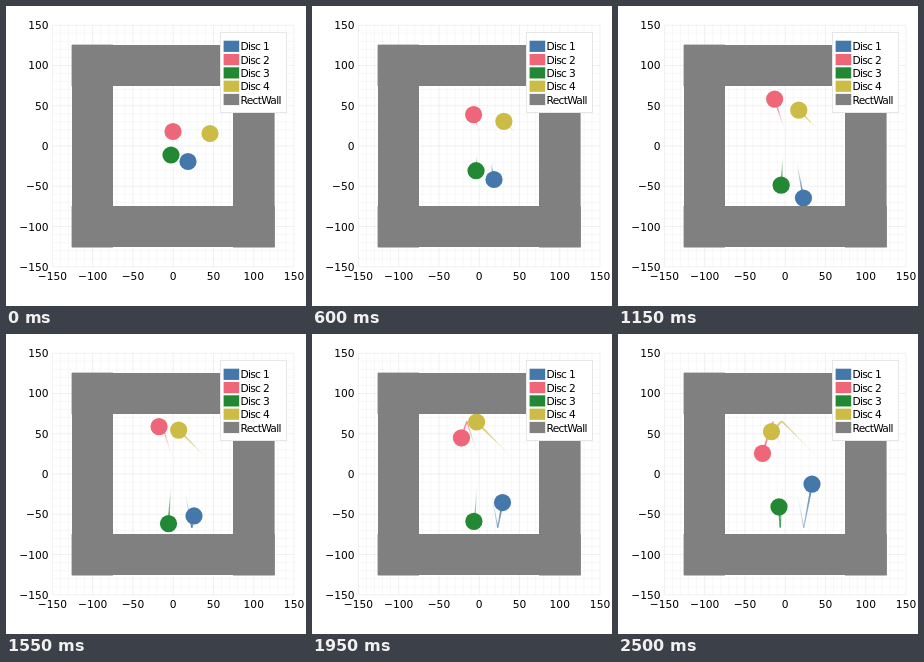
Animation of 300 by 300 pixels, one loop 2.55 s. Source, as an HTML page with a canvas:

```html
<!DOCTYPE html>
<html lang="en">
<head>
<meta charset="utf-8">
<title>Bouncing discs</title>
<style>
  html, body { margin: 0; width: 100%; height: 100%; overflow: hidden; background: #fff; }
  canvas { display: block; width: 300px; height: 300px; }
</style>
</head>
<body>
<canvas id="stage" width="300" height="300"></canvas>
<script>
const ctx = document.getElementById('stage').getContext('2d');
const STEP = 50, STEPS = 51, RADIUS = 8.6;
const TOP = 87.2, BOTTOM = 193.7, SCALE = 0.8055;
const GRAY = '#808080';
const px = x => 167.2 + x * SCALE;
const py = y => 140 - y * SCALE;

// Start point and velocity in pixels per step; a hit switches to a second leg.
const discs = [
  { color: '#4477aa', x: 182, y: 155.5, vx: -0.57, vy: 1.18,
    hit: 4.3, after: { x: 178.2, y: 153.35, vx: 0.316, vy: 1.68 } },
  { color: '#ee6677', x: 167, y: 125.5, vx: -0.45, vy: -1.41 },
  { color: '#228833', x: 165, y: 149, vx: -0.08, vy: 1.31 },
  { color: '#ccbb44', x: 204, y: 127.5, vx: -1.01, vy: -1.013 }
];

function bounce(y) {
  if (y < TOP) return 2 * TOP - y;
  return y > BOTTOM ? 2 * BOTTOM - y : y;
}

function position(disc, step) {
  const leg = step > disc.hit ? disc.after : disc;
  return [leg.x + leg.vx * step, bounce(leg.y + leg.vy * step)];
}

function line(x1, y1, x2, y2) {
  ctx.beginPath();
  ctx.moveTo(x1, y1);
  ctx.lineTo(x2, y2);
  ctx.stroke();
}

function drawAxes() {
  ctx.font = '10.67px "DejaVu Sans", sans-serif';
  ctx.letterSpacing = '0px';
  ctx.lineWidth = 1;
  for (let v = -150; v <= 150; v += 10) {
    const major = v % 50 === 0;
    ctx.strokeStyle = `rgba(0,0,0,${major ? 0.06 : 0.03})`;
    line(px(v), py(150), px(v), py(-150));
    line(px(-150), py(v), px(150), py(v));
    if (!major) continue;
    const label = String(v).replace('-', '\u2212');
    ctx.fillStyle = '#000';
    ctx.textAlign = 'center';
    ctx.fillText(label, px(v), 274);
    ctx.textAlign = 'right';
    ctx.fillText(label, 42.5, py(v) + 4);
  }
}

function drawTrail(disc, step) {
  ctx.strokeStyle = disc.color;
  for (let k = 1; k <= step; k++) {
    ctx.globalAlpha = k / step;
    ctx.lineWidth = 2 * k / step;
    line(...position(disc, k - 1), ...position(disc, k));
  }
  ctx.globalAlpha = 1;
}

function drawDisc(disc, step) {
  ctx.fillStyle = disc.color;
  ctx.beginPath();
  ctx.arc(...position(disc, step), RADIUS, 0, 2 * Math.PI);
  ctx.fill();
}

function drawWalls() {
  ctx.fillStyle = GRAY;
  ctx.fillRect(65.6, 39, 203.2, 41);
  ctx.fillRect(65.6, 200, 203.2, 41);
  ctx.fillRect(66, 38.6, 41, 202.9);
  ctx.fillRect(227, 38.6, 41.6, 202.9);
}

function drawLegend() {
  ctx.fillStyle = '#fff';
  ctx.fillRect(214.5, 26.5, 66, 80);
  ctx.strokeStyle = '#e6e6e6';
  ctx.lineWidth = 1;
  ctx.strokeRect(214.5, 26.5, 66, 80);
  ctx.textAlign = 'left';
  ctx.letterSpacing = '-0.7px';
  [...discs.map(d => d.color), GRAY].forEach((color, i) => {
    const y = 40.3 + i * 13.3;
    ctx.fillStyle = color;
    ctx.fillRect(217.6, y - 5.6, 15.6, 11.2);
    ctx.fillStyle = '#000';
    ctx.fillText(i < 4 ? `Disc ${i + 1}` : 'RectWall', 234.5, y + 4);
  });
}

function draw(now) {
  const step = Math.floor(now / STEP) % STEPS;
  ctx.fillStyle = '#fff';
  ctx.fillRect(0, 0, 300, 300);
  drawAxes();
  discs.forEach(d => drawTrail(d, step));
  discs.forEach(d => drawDisc(d, step));
  drawWalls();
  drawLegend();
}

let start;
function tick(now) {
  start ??= now;
  draw(now - start);
  requestAnimationFrame(tick);
}
draw(0);
requestAnimationFrame(tick);
</script>
</body>
</html>
```
